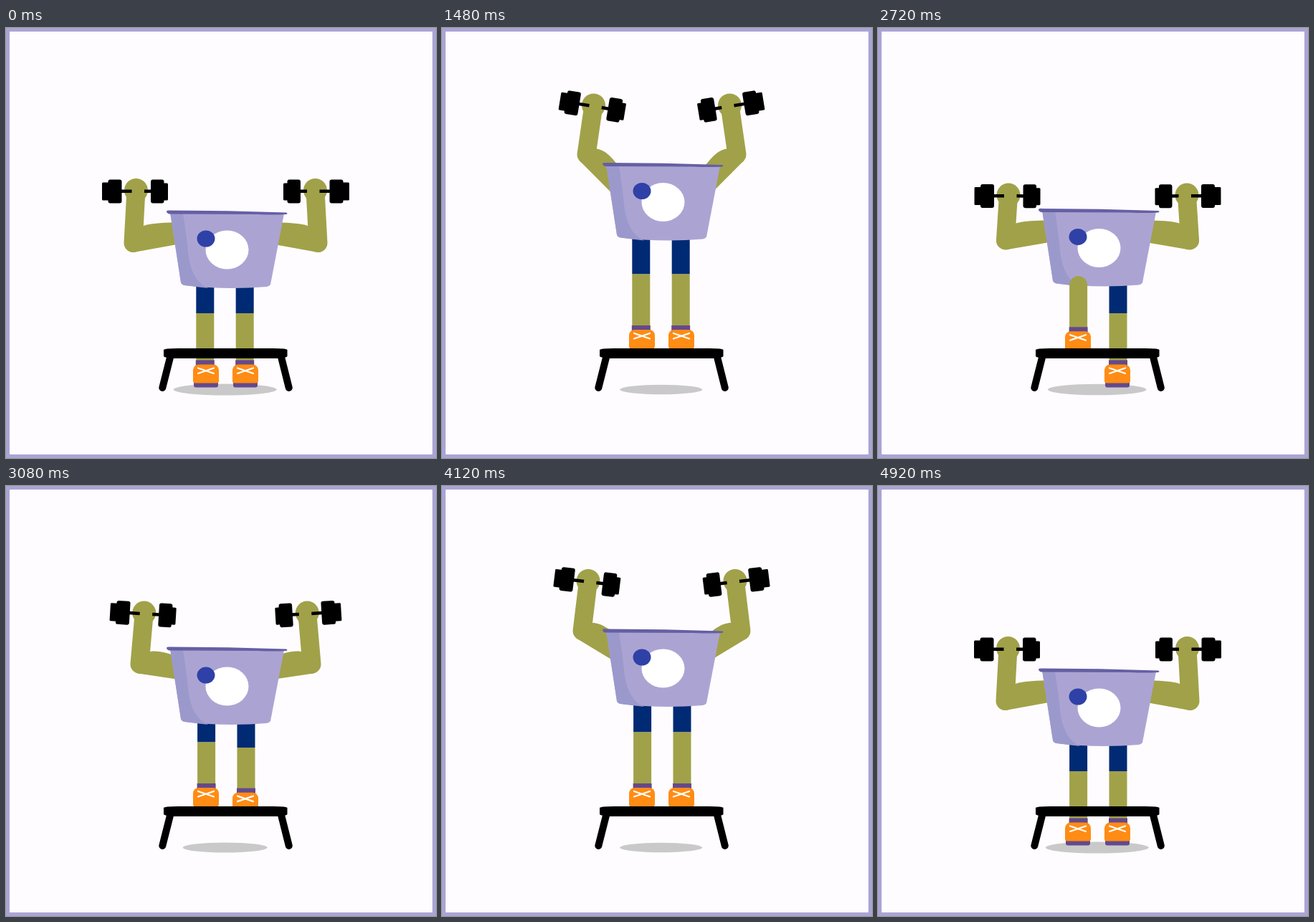
Animation, 600 px wide and 600 px high, one loop 4.96 s. Source, as an HTML page with a canvas:

```html
<!DOCTYPE html>
<html lang="en">
<head>
<meta charset="utf-8">
<title>Step-up workout</title>
<style>
  html, body { margin: 0; height: 100%; overflow: hidden; }
  canvas { display: block; width: 600px; height: 600px; }
</style>
</head>
<body>
<canvas width="600" height="600"></canvas>
<script>
const ctx = document.querySelector('canvas').getContext('2d');
const LOOP = 4960, SECOND_REP = 2400, AXIS = 306.5;
const PAPER = '#fefcff', LILAC = '#aba4d3', SHADE = '#9b99cc', RIM = '#655fa4', OLIVE = '#a1a149',
      NAVY = '#002a74', SOCK = '#64498c', ORANGE = '#ff8c14', EYE = '#2f41a6', SHADOW = '#cac9ca';

const clamp = (v, lo, hi) => Math.min(hi, Math.max(lo, v));
const mix = (a, b, k) => a + (b - a) * k;
function ease(t, from, to) {
  const s = clamp((t - from) / (to - from), 0, 1);
  return s * s * (3 - 2 * s);
}
// Eases from 0 to 1 between a and b, and back between c and d
const pulse = (t, a, b, c, d) => ease(t, a, b) - ease(t, c, d);

function rect(color, x, y, w, h, r = 0) {
  ctx.fillStyle = color;
  ctx.beginPath();
  ctx.roundRect(x, y, w, h, r);
  ctx.fill();
}
function oval(color, x, y, rx, ry = rx) {
  ctx.fillStyle = color;
  ctx.beginPath();
  ctx.ellipse(x, y, rx, ry, 0, 0, 7);
  ctx.fill();
}
function line(color, width, x1, y1, x2, y2) {
  ctx.strokeStyle = color;
  ctx.lineWidth = width;
  ctx.beginPath();
  ctx.moveTo(x1, y1);
  ctx.lineTo(x2, y2);
  ctx.stroke();
}
function shape(color, d) {
  ctx.fillStyle = color;
  ctx.fill(new Path2D(d));
}
function placed(x, y, angle, draw) {
  ctx.save();
  ctx.translate(x, y);
  ctx.rotate(angle);
  draw();
  ctx.restore();
}

function dumbbell() {
  rect('#000', -47.5, -11.5, 11, 25, 1.5);
  rect('#000', -39, -15.5, 19, 33, 3);
  rect('#000', 20.5, -15.5, 18.5, 33, 3);
  rect('#000', 36, -10.5, 8.5, 24, 1.5);
  rect('#000', -21, -1.5, 15, 4.5);
  rect('#000', 11.5, -1.5, 10, 4.5);
}

// Left arm in the frame of the body; press runs from 0 (low) to 1 (overhead)
function arm(press, dip) {
  const ex = mix(177.5, 201.5, press), ey = mix(300, 243, press);
  const hx = mix(181.5, 211.5, press), hy = mix(226.5, 174.5, press) + dip;
  const dx = 245 - ex, dy = 290 - ey, length = Math.hypot(dx, dy);
  line(OLIVE, 26, hx, hy, ex, ey);
  placed(ex, ey, Math.atan2(dy, dx), () =>
    shape(OLIVE, `M0 -12 C10 -24 25 -25 ${length} -19 V10.5 L0 13 Z`));
  oval(OLIVE, hx, hy, 16.5);
  placed(hx, hy + .5, mix(0, .162, press), dumbbell);
}

function body() {
  shape(LILAC, 'M229 257 L388 259 L369 358 Q368 360 364 361 Q306 366 249 359 Q245 358 244 355 Z');
  shape(SHADE, 'M229 257 L247 259 Q251 282 254 312 Q258 353 282 363 Q264 361 249 359 Q245 358 244 355 Z');
  shape(RIM, 'M224 255.5 Q225 254 229 254.5 Q310 254.5 391 257.5 Q394 259 391 260 Q375 261 350 260 L228 259.5 Q224 258.5 224 255.5 Z');
  oval('#fff', 308.5, 309.5, 30, 27);
  oval(EYE, 279, 294, 12.5, 11.5);
}

// The knee turns round and passes in front of the body when it is raised
function calf({ x, shoeX, foot, knee }, hem) {
  const cap = clamp(hem - knee, 0, 12.5);
  ctx.fillStyle = OLIVE;
  ctx.beginPath();
  ctx.moveTo(x - 12.5, 465 + foot);
  ctx.ellipse(x, knee + cap, 12.5, cap, 0, Math.PI, 2 * Math.PI);
  ctx.lineTo(x + 12.5, 465 + foot);
  ctx.fill();
  placed(shoeX, foot, 0, () => {
    rect(SOCK, x - 13 - shoeX, 463.5, 26, 9);
    rect(SOCK, -17, 493, 34, 8.5, 3);
    rect(ORANGE, -18, 469.5, 36, 26, [8, 8, 3, 3]);
    for (const side of [-11, 11]) line('#fff', 2.2, side, 474.5, -side, 482);
  });
}

function bench() {
  line('#000', 10, 229.7, 457, 218.3, 502);
  line('#000', 10, 383.5, 457, 394.8, 502);
  shape('#000', 'M220 449 Q222 447 240 447 H373 Q391 447 392.5 449 V458 Q391 461 373 461 H240 Q222 461 220 458 Z');
}

function draw(time) {
  const second = time >= SECOND_REP;
  let t = second ? time - SECOND_REP : time;
  if (second) t += clamp(t - 1440, 0, 120); // shorter pause overhead

  const lift = -66.5 * pulse(t, 200, 1230, 1640, 2400);
  const press = pulse(t, 238, 1304, 1600, 2340);
  const dip = 10 * pulse(t, 100, 320, 320, 620);
  const bend = 14 * pulse(t, 320, 680, 680, 1080);
  const shadow = pulse(t, 100, 820, 1860, 2380);
  const steps = [pulse(t, 60, 360, 1860, 2130), pulse(t, 420, 760, 2110, 2370)];
  if (!second) steps.reverse(); // the right leg leads first
  const legs = steps.map((step, i) => ({
    x: (second ? 279.6 : 277.8) + 55.4 * i,
    shoeX: 279 + 55 * i,
    foot: -48.5 * step,
    knee: 398 - 54.5 * step + bend
  }));

  rect(LILAC, 0, 0, 600, 600);
  rect(PAPER, 5, 5, 590, 590);
  oval(SHADOW, 305.7, 504.5, mix(72, 57.5, shadow), mix(8, 6.8, shadow));
  ctx.lineCap = 'round';
  placed(0, lift, 0, () => {
    arm(press, dip);
    ctx.translate(2 * AXIS, 0);
    ctx.scale(-1, 1);
    arm(press, dip);
  });
  for (const { x, knee } of legs) rect(NAVY, x - 12.5, 330 + lift, 25, knee - 330 - lift);
  placed(0, lift, 0, body);
  for (const leg of legs) calf(leg, 361 + lift);
  bench();
}

function tick() {
  draw(performance.now() % LOOP);
  requestAnimationFrame(tick);
}
tick();
</script>
</body>
</html>
```
